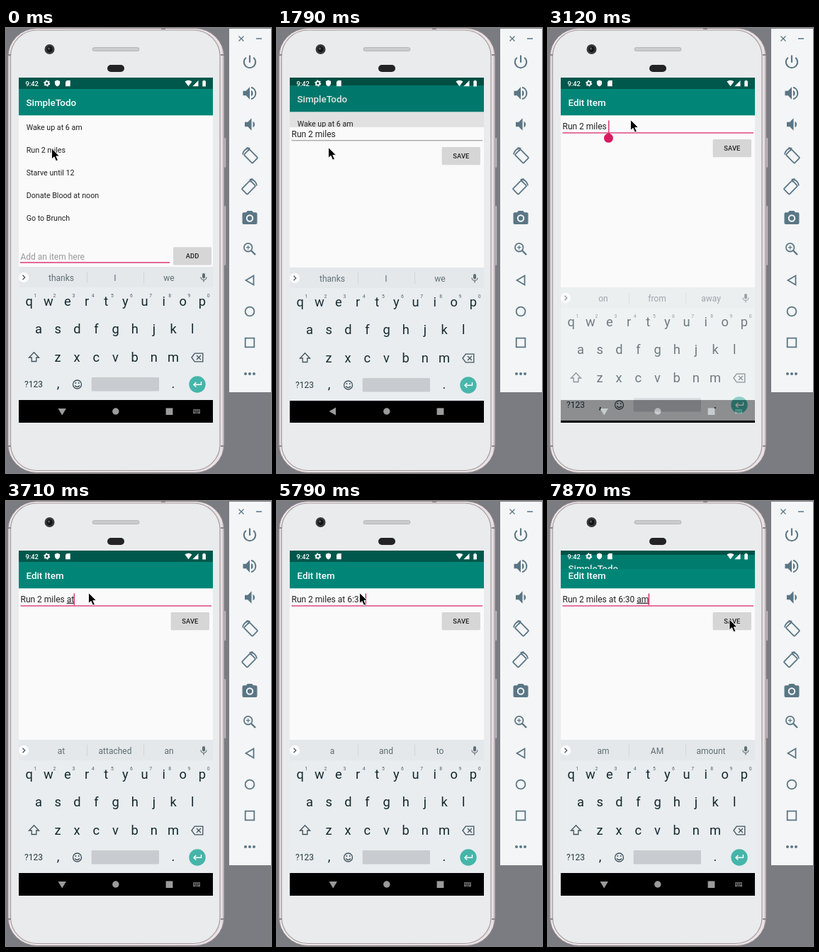
Animation, 374 px wide and 628 px high, one loop 8 s. Source, as an HTML page:

```html
<!DOCTYPE html>
<html lang="en">
<head>
<meta charset="utf-8">
<title>Todo list on a phone</title>
<style>
html, body { margin: 0; width: 100%; height: 100%; overflow: hidden; background: #7b7b82; }
svg { display: block; width: 374px; height: 628px; font-family: Roboto, sans-serif; }
text { white-space: pre; }
.title { font-size: 13.33px; font-weight: 500; fill: #fff; }
.row { font-size: 10.67px; fill: #212121; }
.field { font-size: 12px; fill: #212121; }
.button { font-size: 9.33px; font-weight: 500; fill: #212121; letter-spacing: .1px; }
.mid { text-anchor: middle; }
.key { font-size: 18.3px; fill: #14292f; }
.digit { font-size: 6.8px; fill: #4f6067; }
.hintword { font-size: 12px; fill: #5f6e75; }
.line { fill: none; stroke-width: 2; }
</style>
</head>
<body>
<svg viewBox="0 0 374 628" xmlns="http://www.w3.org/2000/svg">
  <defs>
    <clipPath id="screenClip"><rect x="18" y="70" width="274" height="487"/></clipPath>
    <clipPath id="editClip"><rect id="editClipBox" x="18" y="70" width="274" height="487"/></clipPath>
    <linearGradient id="rim"><stop stop-color="#c4bcbe"/><stop offset=".012" stop-color="#efe8e9"/>
      <stop offset=".988" stop-color="#e9e1e3"/><stop offset="1" stop-color="#b7aeb1"/></linearGradient>
  </defs>

  <rect width="374" height="628" fill="#7b7b82"/>
  <g id="phone">
    <rect x="306" y="155" width="4" height="42" rx="1" fill="#dcd3d5" stroke="#99929a" stroke-width=".7"/>
    <rect x="306" y="251" width="4" height="84" rx="1" fill="#dcd3d5" stroke="#99929a" stroke-width=".7"/>
    <rect x="2.5" y=".5" width="305.500" height="627" rx="41" fill="url(#rim)" stroke="#8e868a"/>
    <rect x="6.5" y="3" width="295.500" height="621.500" rx="37" fill="#e9ebed" stroke="#a49b9e" stroke-width="1.200"/>
    <path d="M3 38h4M3 590h4M303 38h4M303 590h4M219 1h6" stroke="#8e868a" stroke-width="2"/>
    <circle cx="61.5" cy="30" r="7" fill="#3a3a3c"/><circle cx="61.5" cy="30" r="4.2" fill="#151517"/>
    <circle cx="60.5" cy="29" r="1.7" fill="#55565a"/>
    <rect x="122" y="27.5" width="66" height="5" rx="2.5" fill="#c9cbcd" stroke="#aeb0b3" stroke-width=".8"/>
    <rect x="143" y="52" width="24" height="10" rx="5" fill="#232325"/>
  </g>

  <g clip-path="url(#screenClip)">
    <rect x="18" y="70" width="274" height="487" fill="#fafafa"/>
    <g id="listPage"></g>
    <rect id="dim" x="18" y="70" width="274" height="455"/>
    <g clip-path="url(#editClip)"><g id="editPage"></g></g>
    <g id="statusIcons" fill="#fff">
      <text x="27.5" y="81.7" font-size="9.33" font-weight="500">9:42</text>
      <circle cx="57.7" cy="78" r="2.6" fill="none" stroke="#fff" stroke-width="1.9"/>
      <circle cx="57.7" cy="78" r="3.9" fill="none" stroke="#fff" stroke-width="1.2" stroke-dasharray="2 2.08"/>
      <path d="M72.5 73.6l3.6 1.5v3q-.3 3.3-3.6 4.5-3.3-1.2-3.6-4.5v-3zM86 74h4.7v8.2H84v-6.2z"/>
      <path d="M252.5 75.5q5-3.4 10 0l-5 6.8zM271.5 74v8.2h-8.2z"/>
      <path d="M278.6 73.7h2v1h1.3v7.7h-4.6v-7.7h1.3z"/>
    </g>
    <g id="navBar" fill="#9b9b9b">
      <rect x="18" y="525" width="274" height="32" fill="#000"/>
      <path id="backLeft" d="M83 535.5v11l-9.5-5.5z"/>
      <path id="backDown" d="M73.5 537h11.4l-5.7 9.5z"/>
      <circle cx="154.8" cy="541" r="4.7"/>
      <rect x="225.6" y="536.4" width="9.8" height="9.6"/>
      <g id="keyboardIcon"><rect x="264" y="538" width="10" height="6.3" rx=".6" fill="#727272"/>
        <path d="M264.8 539.7h8.4M264.8 541.4h8.4M266.8 543.1h4.4" stroke="#000" stroke-width="1" stroke-dasharray="1 .5"/></g>
    </g>
    <g id="keyboard"></g>
  </g>

  <g id="panel">
    <rect x="315" y="1" width="59" height="513" fill="#f4f5f6"/>
    <g stroke="#5c7684" fill="none" stroke-width="1.3"><path d="M328.5 11.5l7 7m0-7l-7 7M353 15h8"/></g>
    <g id="tools" fill="#5a7685" stroke="#5a7685" stroke-width="0"></g>
  </g>

  <path id="pointer" d="M0 0V15l3.5-3.2 2.6 6 2.8-1.2-2.6-5.7H11z" fill="#000" stroke="#fff" stroke-width=".9"/>
</svg>
<script>
const $ = id => document.getElementById(id);
const PINK = '#d81b60', LOOP = 8000;

const label = (cls, x, y, text, more = '') => `<text class="${cls}" x="${x}" y="${y}" ${more}>${text}</text>`;
const box = (x, y, w, h, fill, more = '') => `<rect x="${x}" y="${y}" width="${w}" height="${h}" fill="${fill}" ${more}/>`;
const button = (id, x, y, text) =>
  box(x, y + .7, 54, 24.6, '#bdbdbd', 'rx="1.5" opacity=".6"') +
  box(x, y, 54, 24.3, '#d6d6d6', `rx="1.3" id="${id}"`) +
  label('button mid', x + 27, y + 15.6, text);
const header = title =>
  box(18, 50, 274, 36, '#00574b') + box(18, 86, 274, 37.3, '#008577') + label('title', 28.5, 109.8, title);

const items = ['Wake up at 6 am', 'Run 2 miles', 'Starve until 12', 'Donate Blood at noon', 'Go to Brunch'];
$('listPage').innerHTML = box(18, 70, 274, 487, '#fafafa') + header('SimpleTodo') +
  items.map((item, i) => label('row', 28.7, 143.5 + 32 * i, item)).join('') +
  label('field', 20.5, 326.5, 'Add an item here', 'style="fill:#9b9b9b"') +
  box(20, 330.2, 211, 1.6, PINK, 'opacity=".8"') +
  box(20.3, 313.5, 1.4, 16, PINK, 'id="addCaret"') +
  button('add', 236, 309.3, 'ADD');

$('editPage').innerHTML = box(18, 70, 274, 487, '#fafafa') + header('Edit Item') +
  '<text class="field" x="20.5" y="142.7" id="entry"><tspan id="plain"></tspan><tspan id="composing" text-decoration="underline"></tspan></text>' +
  box(20.5, 147.3, 269.5, 1, '#8b8b8b', 'id="underline"') +
  box(0, 130.5, 1.3, 16.5, PINK, 'id="caret"') +
  `<path id="handle" d="M0 147.5l4.6 3.2a6.5 6.5 0 1 1-9.2 0z" fill="${PINK}"/>` +
  button('save', 232.8, 157, 'SAVE');

const keyRow = (letters, x, y) =>
  [...letters].map((c, i) => label('key mid', x + 27.15 * i, y, c)).join('');
$('keyboard').innerHTML = box(18, 337, 274, 188, '#e9edf0') + box(18, 337, 274, 29, '#e4e8eb') +
  '<circle cx="25" cy="352" r="7.2" fill="#fbfcfc"/><path class="line" d="M23.5 348.8l3.2 3.2-3.2 3.2" stroke="#455a64" style="stroke-width:1.3"/>' +
  '<path d="M114.5 344v16M194.5 344v16" stroke="#cfd5d8"/>' +
  [78, 154, 230].map((x, i) => label('hintword mid', x, 356.5, '', `id="word${i}"`)).join('') +
  '<rect x="277" y="346" width="4" height="7.5" rx="2" fill="#5f6e75"/><path class="line" d="M275 351.5a4 4 0 0 0 8 0M279 355.5v3" stroke="#5f6e75" style="stroke-width:1.2"/>' +
  keyRow('qwertyuiop', 32.6, 391.8) + keyRow('asdfghjkl', 46, 431) + keyRow('zxcvbnm', 73, 470.7) +
  [...'1234567890'].map((c, i) => label('digit mid', 41.2 + 27.15 * i, 379.5, c)).join('') +
  '<g fill="none" stroke="#3f525a" stroke-width="1.3"><path d="M39.5 457.8l7 7.2h-3.7v5.500h-6.600V465h-3.700z"/>' +
  '<path d="M262 465l4.300-5.800h11.500v11.600h-11.500zM269 462l6 6m0-6l-6 6"/>' +
  '<circle cx="100.500" cy="503" r="6"/><path d="M97 504.500q3.500 4 7 0"/></g>' +
  '<circle cx="98.300" cy="501" r="1" fill="#3f525a"/><circle cx="102.700" cy="501" r="1" fill="#3f525a"/>' +
  label('hintword mid', 39, 507.2, '?123', 'style="fill:#263a41"') +
  label('key mid', 73.5, 508, ',') + label('key mid', 236, 508, '.') +
  box(120.7, 493, 95.3, 19.5, '#c8ccd0', 'rx="1.5"') +
  '<circle cx="270" cy="503" r="11.700" fill="#45b5a9"/><path class="line" d="M275.500 499v4.300h-10.500m3.300-3.300l-3.300 3.300 3.300 3.300" stroke="#fff" style="stroke-width:1.400"/>';

// Emulator tool icons, each drawn around its own centre.
const rotate = '<g class="line" style="stroke-width:1.800"><rect x="-5.500" y="-8.500" width="11" height="17" rx="1.200" transform="translate(1.500 1) rotate(-45)"/><path d="M-10-1.500A10 10 0 0 1-1.500-10.500M-4.500-11l4 .8-1.500 3.700"/></g>';
const tools = [
  '<path class="line" d="M0-9.500V.8M-5.200-6.300a8.200 8.200 0 1 0 10.400 0" style="stroke-width:2.100"/>',
  '<path d="M-9.500-3.200v6.400h4.200L0 8.700V-8.700l-5.300 5.500zM2-4.300v8.600a4.800 4.800 0 0 0 0-8.600z"/><path class="line" d="M2-8.300a8.600 8.600 0 0 1 0 16.600"/>',
  '<path d="M-7-3.200v6.400h4.200L2.500 8.700V-8.700l-5.300 5.500zM4.500-4.300v8.600a4.800 4.800 0 0 0 0-8.600z"/>',
  rotate,
  `<g transform="scale(-1 1)">${rotate}</g>`,
  '<path d="M-3.200-10h6.400l2 2.200H8.500a2 2 0 0 1 2 2V7a2 2 0 0 1-2 2h-17a2 2 0 0 1-2-2V-5.800a2 2 0 0 1 2-2h3.300z"/><circle cy=".5" r="4.200" fill="none" stroke="#f4f5f6" stroke-width="2"/>',
  '<path class="line" d="M2 2L8 8" style="stroke-width:2.400"/><circle class="line" cx="-2.300" cy="-2.300" r="5.800" style="stroke-width:1.800"/><path class="line" d="M-5-2.300h5.400m-2.700-2.700v5.400" style="stroke-width:1.200"/>',
  '<path class="line" d="M5.500-6.500v13L-5.500 0z" style="stroke-width:1.800"/>',
  '<circle class="line" r="6.400" style="stroke-width:1.800"/>',
  '<path class="line" d="M-6.300-6.300H6.300V6.300H-6.300z" style="stroke-width:1.800"/>',
  '<circle cx="-6" r="2"/><circle r="2"/><circle cx="6" r="2"/>'
];
$('tools').innerHTML = tools.map((icon, i) => `<g transform="translate(344 ${48 + 44 * i})">${icon}</g>`).join('');

// Each step changes part of the state and holds until the next one.
// list: [shift, dim], edit: [shift, clip top], keys: [shift, opacity], text: [plain, composing]
const steps = [
  [0, { pointer: [64.5, 170], list: [0, 0], edit: [0, 557], keys: [0, 1], text: ['Run 2 miles', ''],
        words: 'thanks I we', addCaret: 0, caret: 0, handle: 0, focus: 0, down: 1, press: 0 }],
  [150, { pointer: [68, 169.5] }],
  [290, { pointer: [72, 169.5], addCaret: 1 }],
  [440, { pointer: [74, 169.5] }],
  [740, { pointer: [72.5, 168.5], addCaret: 0 }],
  [1190, { addCaret: 1 }],
  [1640, { addCaret: 0 }],
  [1790, { list: [-5, .1], edit: [11, 140], keys: [1, .98], down: 0 }],
  [1940, { edit: [3, 70], keys: [25, .4] }],
  [2090, { pointer: [76, 163], edit: [1, 70], keys: [49, 0] }],
  [2230, { pointer: [94, 148], edit: [0, 70] }],
  [2380, { pointer: [111, 134] }],
  [2530, { pointer: [116.5, 129.5] }],
  [2830, { text: ['Run 2 miles ', ''], focus: 1, caret: 1 }],
  [2980, { handle: 1, words: 'on from away', keys: [45, .15], down: 1 }],
  [3120, { keys: [29, .6] }],
  [3270, { keys: [6, .93] }],
  [3420, { keys: [0, 1] }],
  [3570, { text: ['Run 2 miles ', 'a'], handle: 0, words: 'a at and' }],
  [3710, { text: ['Run 2 miles ', 'at'], words: 'at attached an' }],
  [3860, { text: ['Run 2 miles at ', ''] }],
  [4010, { words: 'work the least' }],
  [4460, { text: ['Run 2 miles at 6', ''] }],
  [4610, { words: 'a and to' }],
  [4900, { text: ['Run 2 miles at 6:', ''], words: '' }],
  [5050, { words: 'a and to' }],
  [5350, { text: ['Run 2 miles at 6:3', ''], words: '' }],
  [5500, { text: ['Run 2 miles at 6:30', ''] }],
  [5790, { text: ['Run 2 miles at 6:30 ', ''], words: 'a and to' }],
  [6240, { text: ['Run 2 miles at 6:30 ', 'a'] }],
  [6390, { text: ['Run 2 miles at 6:30 ', 'am'] }],
  [6540, { words: 'am AM amount' }],
  [6830, { pointer: [122, 131] }],
  [6980, { pointer: [158, 141], caret: 0 }],
  [7130, { pointer: [210, 157] }],
  [7280, { pointer: [246, 167] }],
  [7420, { pointer: [256, 167], caret: 1 }],
  [7570, { press: 1 }],
  [7720, { press: 0 }],
  [7870, { list: [-10, .07], edit: [0, 96] }]
];

const set = (id, attrs) => Object.entries(attrs).forEach(([k, v]) => $(id).setAttribute(k, v));
const show = (id, on) => set(id, { visibility: on ? 'visible' : 'hidden' });
const move = (id, x, y) => set(id, { transform: `translate(${x} ${y})` });

function draw(t) {
  const past = steps.filter(([at]) => at <= t);
  const s = Object.assign({}, ...past.map(([, change]) => change));
  move('pointer', ...s.pointer);
  move('listPage', 0, s.list[0]);
  set('dim', { opacity: s.list[1] });
  move('editPage', 0, s.edit[0]);
  set('editClipBox', { y: s.edit[1], height: 557 - s.edit[1] });
  move('keyboard', 0, s.keys[0]);
  set('keyboard', { opacity: s.keys[1] });
  $('plain').textContent = s.text[0];
  $('composing').textContent = s.text[1];
  const words = s.words.split(' ');
  for (let i = 0; i < 3; i++) $('word' + i).textContent = words[i] || '';
  const end = 20.5 + $('entry').getComputedTextLength();
  set('caret', { x: end - .6 });
  move('handle', end - .3, 0);
  set('underline', s.focus ? { fill: PINK, height: 1.4, opacity: .85 } : { fill: '#8b8b8b', height: 1, opacity: 1 });
  set('save', { fill: s.press ? '#c4c4c4' : '#d6d6d6' });
  show('addCaret', s.addCaret);
  show('caret', s.caret);
  show('handle', s.handle);
  show('backDown', s.down);
  show('backLeft', !s.down);
  show('keyboardIcon', s.down);
}

const start = performance.now();
function tick() {
  draw((performance.now() - start) % LOOP);
  requestAnimationFrame(tick);
}
tick();
</script>
</body>
</html>
```
